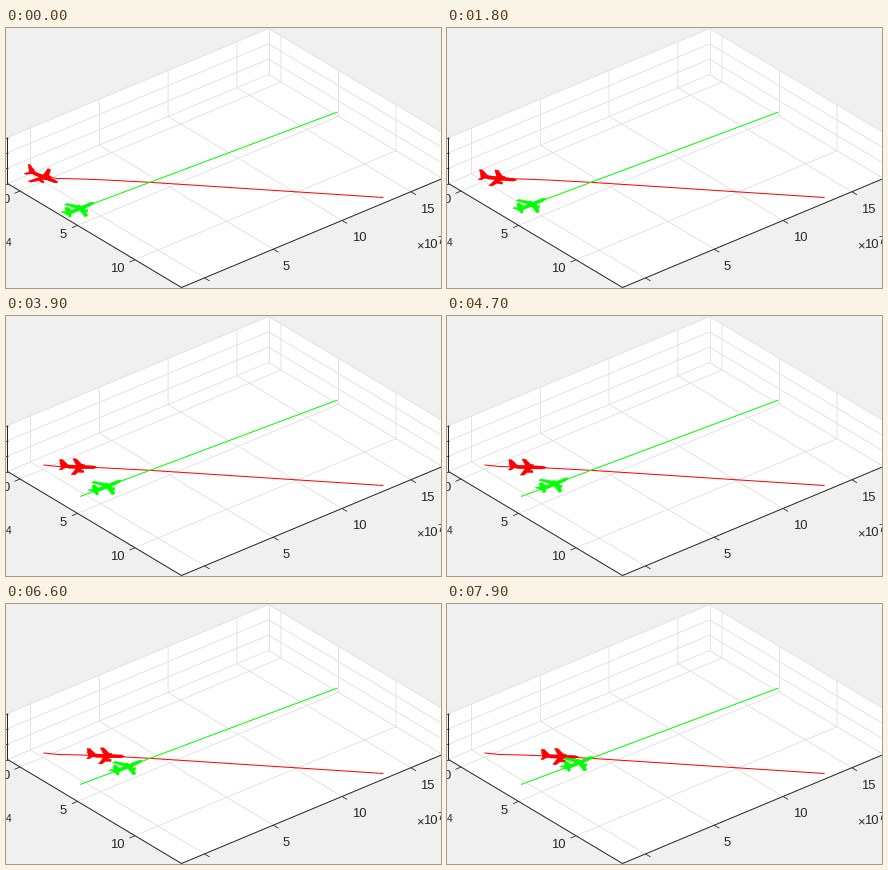
These frames come from a looping animation (435x260 px, 8000 ms). A matplotlib script:

```python
import numpy as np
import matplotlib.pyplot as plt
from matplotlib.animation import FuncAnimation
from matplotlib.patches import Polygon

W, H, DPI = 435, 260, 64
PX = 72 / DPI
INK, GRID = "#262626", "#dedede"
RED, GREEN = "#ff0000", "#00ff00"

fig = plt.figure(figsize=(W / DPI, H / DPI), dpi=DPI, facecolor="#f0f0f0")
ax = fig.add_axes([0, 0, 1, 1])
ax.set_xlim(-0.5, W - 0.5)
ax.set_ylim(H - 0.5, -0.5)
ax.axis("off")

# Screen vectors of the box edges and of unit lengths along x, y, z
LEFT = np.array([1, 155])
DX, DY, DZ = np.array([174, 104]), np.array([261, -109]), np.array([0, -46])
EX, EY, EZ = np.array([.643, .383]), np.array([.766, -.321]), np.array([0, -.866])


def line(*pts, color=GRID, width=0.8, z=2):
    x, y = zip(*pts)
    ax.plot(x, y, color=color, lw=width * PX, zorder=z, solid_capstyle="butt")


def label(x, y, text, ha="center", size=13):
    ax.text(x, y, text, ha=ha, va="center_baseline", color=INK, fontsize=size * PX,
            family="Liberation Sans", zorder=4)


def draw_box():
    back, front = LEFT + DY, LEFT + DX
    outline = [LEFT, front, front + DY, back + DX + DZ, back + DZ, LEFT + DZ]
    ax.add_patch(Polygon(outline, fc="white", ec="none", zorder=1))
    for f in np.arange(4) / 3:
        line(LEFT + f * DZ, back + f * DZ, back + DX + f * DZ)
        line(LEFT + f * DZ, LEFT + f * DZ - [4, 0], color=INK)
    for i, text in enumerate(["0", "5", "10"]):
        p = LEFT + DX * (12.5 + 57.5 * i) / 174
        line(p, p + DY, p + DY + DZ)
        line(p, p + [-5.5, 2.4], color=INK, z=3)
        label(p[0] - 10.5, p[1] + 8, text, "right")
    for i, text in enumerate(["", "5", "10", "15"]):
        p = front + DY * (23 + 68.8 * i) / 261
        line(p, p - DX, p - DX + DZ)
        line(p, p + [5, 3], color=INK, z=3)
        label(p[0] + 9.5, p[1] + 16.5, text, "left")
    line(back, back + DZ)
    line(LEFT + DZ, LEFT, front, front + DY, color=INK, width=1, z=3)
    label(409.5, 216, "×", "left")
    label(417, 215.5, "10", "left")
    label(431, 211.5, "7", "left", 10)
    label(-0.5, 214, "4", "left", 10)


# Plane parts as (back from nose, right, up)
def mirrored(part):
    return [part, [(s, -r, u) for s, r, u in part]]


PARTS = [
    [(0, 0, 0), (2, 1.3, 0), (6, 2, 0), (28, 2, 0), (36, .6, 0),
     (36, -.6, 0), (28, -2, 0), (6, -2, 0), (2, -1.3, 0)],
    [(0, 0, 0), (3, 0, 1.6), (28, 0, 2), (36, 0, 1.6),
     (36, 0, 0), (28, 0, -1.8), (4, 0, -1.6)],
    [(28, 0, 1), (34.5, 0, 8), (37.5, 0, 8), (36, 0, 0)],
]
PARTS += mirrored([(12.5, 0, 0), (21.5, 16, 0), (25, 16, 0), (21, 4, 0), (21, 0, 0)])
PARTS += mirrored([(30, 0, 0), (35, 6.5, 0), (37.5, 6.5, 0), (35, 0, 0)])
PARTS += mirrored([(13, 6, -.3), (13, 6, -2.6), (18, 6, -2.6), (18, 6, -.3)])


class Plane:
    def __init__(self, color, z):
        self.shapes = [Polygon([(0, 0)] * 3, fc=color, ec=color, lw=0.5 * PX, zorder=z)
                       for _ in PARTS]
        for s in self.shapes:
            ax.add_patch(s)

    def place(self, center, heading):
        t = np.radians(heading)
        fwd = np.cos(t) * EY + np.sin(t) * EX
        right = np.cos(t) * EX - np.sin(t) * EY
        for shape, part in zip(self.shapes, PARTS):
            s, r, u = np.array(part).T[:, :, None]
            shape.set_xy(center + (18 - s) * fwd + r * right + u * EZ)


RED_PATH = [(37, 148.5), (52, 150), (75, 150.5), (100, 151.5), (143, 153.8), (377, 169)]
GREEN_PATH = [(73.5, 180), (331, 83.5)]

draw_box()
line(*RED_PATH, color=RED, width=1, z=5)
line(*GREEN_PATH, color=GREEN, width=1, z=6)
red, green = Plane(RED, 7), Plane(GREEN, 8)


def on_path(path, x):
    return np.array([x, np.interp(x, *zip(*path))])


def update(i):
    k = max(0, i - 4)
    red.place(on_path(RED_PATH, 37 + 1.015 * k), 43 + 35 * max(0, 1 - k / 18))
    green.place(on_path(GREEN_PATH, 73.5 + 0.775 * k), 0)
    return red.shapes + green.shapes


anim = FuncAnimation(fig, update, frames=80, interval=100, repeat=True, repeat_delay=0)
plt.show()
```
